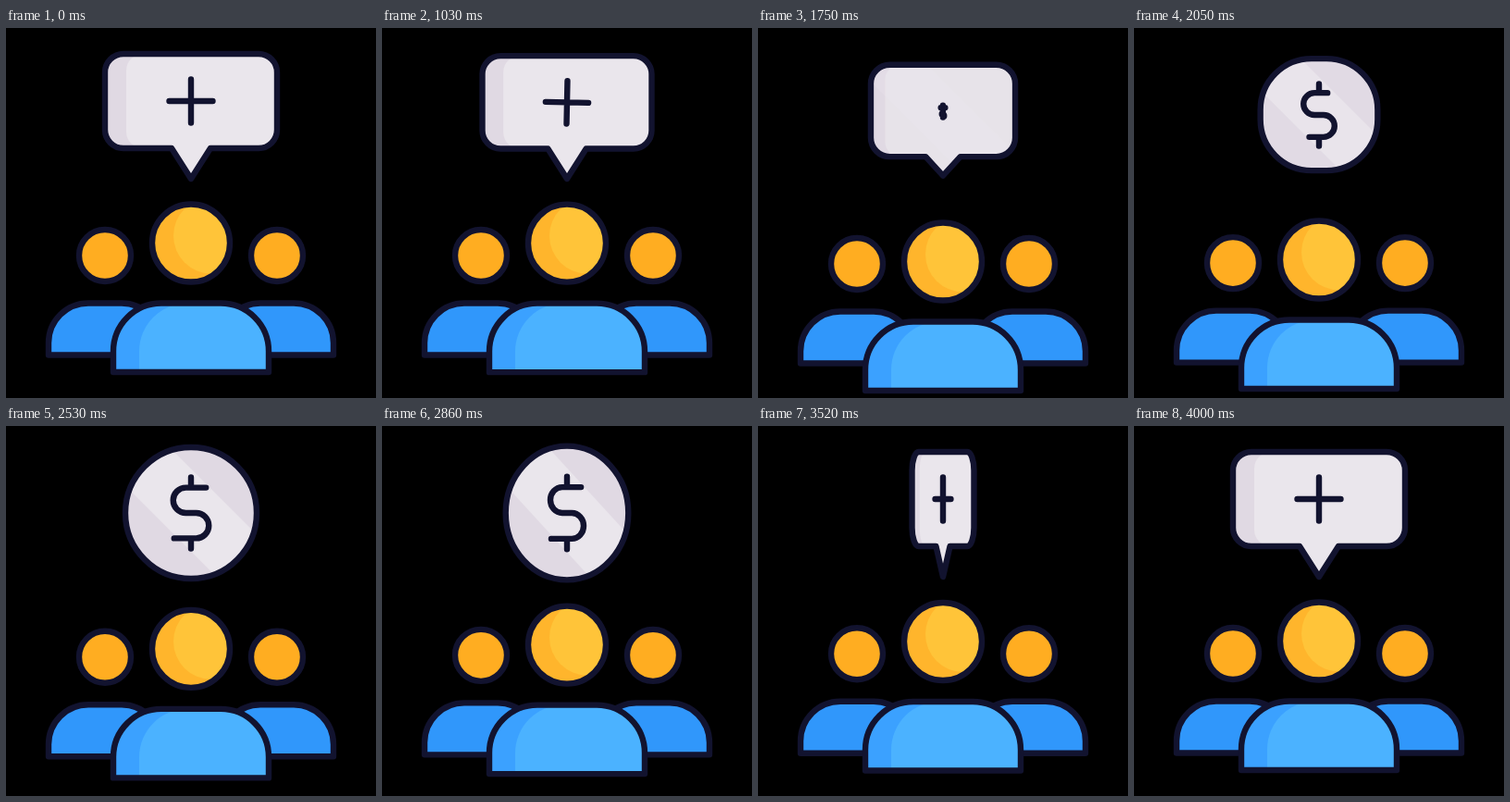
These frames come from a looping animation (400 by 400 pixels, 4030 ms). An HTML page with a canvas:

```html
<!DOCTYPE html>
<html lang="en">
<head>
<meta charset="utf-8">
<title>Team funding</title>
<style>
html, body { margin: 0; width: 100%; height: 100%; overflow: hidden; background: #000; }
canvas { display: block; width: 100vw; height: 100vh; object-fit: contain; }
</style>
</head>
<body>
<canvas width="400" height="400"></canvas>
<script>
const ctx = document.querySelector('canvas').getContext('2d');
const LOOP = 4030, START = 1030, STEP = 30, FLIP = 3400;
const INK = '#12132f', LIGHT = '#eae6ec', SHADE = '#e0d9e3';

const mix = (a, b, k) => a + (b - a) * k;
const clamp = k => Math.max(0, Math.min(1, k));
const linear = k => k;
const smooth = k => k * k * (3 - 2 * k);
const quadIn = k => k * k;
const quadOut = k => k * (2 - k);

function bezier(x1, x2) {
  return k => {
    let lo = 0, hi = 1;
    for (let i = 0; i < 24; i++) {
      const t = (lo + hi) / 2, u = 1 - t;
      const x = 3 * u * u * t * x1 + 3 * u * t * t * x2 + t * t * t;
      if (x < k) lo = t; else hi = t;
    }
    return smooth(lo);
  };
}
const settle = bezier(.33, .2);

// Each key is [time, value, easing towards this key].
function track(...keys) {
  return t => {
    if (t <= keys[0][0]) return keys[0][1];
    for (let i = 1; i < keys.length; i++) {
      const [t0, v0] = keys[i - 1], [t1, v1, ease = smooth] = keys[i];
      if (t < t1) return mix(v0, v1, ease((t - t0) / (t1 - t0)));
    }
    return keys[keys.length - 1][1];
  };
}

const drop = track([1000, 0], [1620, 20, settle], [1700, 20], [4000, 0, settle]);
const size = track([1000, 1], [1150, .92, linear], [1550, 1.074], [1860, .82],
  [2050, .883, linear], [2530, 1.014, linear], [2640, 1.055, quadOut], [3160, 1]);
const morph = track([1560, 0], [2150, 1]);
const flip = track([2640, 1], [FLIP, 0, quadIn], [4000, 1, quadOut]);
const plusTurn = track([1000, 0], [1150, 6, linear], [1390, -7, linear], [1550, -15], [1800, 0]);
const plusSize = track([1560, 1], [1800, 0]);
const signSize = track([1700, 0], [2000, 1]);
const signDraw = track([1750, 0], [2200, 1]);

function outline() {
  ctx.strokeStyle = INK;
  ctx.lineWidth = 6.4;
  ctx.lineCap = ctx.lineJoin = 'round';
  ctx.stroke();
}

function clipped(path, paint) {
  ctx.save();
  path();
  ctx.clip();
  paint();
  ctx.restore();
  path();
  outline();
}

function disc(x, y, r) {
  ctx.beginPath();
  ctx.arc(x, y, r, 0, 7);
}

function torso(left, right, top, bottom, r) {
  ctx.beginPath();
  ctx.moveTo(left, bottom);
  ctx.lineTo(left, top + r);
  ctx.arc(left + r, top + r, r, Math.PI, Math.PI * 1.5);
  ctx.arc(right - r, top + r, r, -Math.PI / 2, 0);
  ctx.lineTo(right, bottom);
  ctx.closePath();
}

function fill(color) {
  ctx.fillStyle = color;
  ctx.fill();
}

function sidePerson(x, dy) {
  torso(x - 61, x + 61, 297.5 + dy, 353.5 + dy, 43);
  fill('#3097fb');
  outline();
  disc(x, 246 + dy, 28);
  fill('#ffad21');
  outline();
}

function leader(dy) {
  const body = () => torso(116, 284, 297.5 + dy, 372 + dy, 52);
  clipped(body, () => {
    body();
    fill('#3ba1ff');
    torso(144, 340, 297.5 + dy, 380 + dy, 52);
    fill('#4bb2ff');
  });
  clipped(() => disc(200, 232.5 + dy, 42), () => {
    disc(200, 232.5 + dy, 42);
    fill('#ffb52c');
    disc(222, 224.5 + dy, 41);
    fill('#ffc439');
  });
}

// Rounded box with a tail; with radius equal to half its width it is a disc.
function balloon(w, top, bottom, r, tail) {
  const base = 21 * Math.min(1, tail / 8);
  ctx.beginPath();
  ctx.moveTo(0, top);
  ctx.arcTo(w, top, w, bottom, r);
  ctx.arcTo(w, bottom, 0, bottom, r);
  if (tail > 0) {
    ctx.lineTo(base, bottom);
    ctx.lineTo(0, bottom + tail);
    ctx.lineTo(-base, bottom);
  }
  ctx.arcTo(-w, bottom, -w, top, r);
  ctx.arcTo(-w, top, 0, top, r);
  ctx.closePath();
}

// Builds a path in scaled space, so that the line keeps its weight.
function scaled(x, y, sx, sy, turn, path) {
  ctx.save();
  ctx.translate(x, y);
  ctx.scale(sx, sy);
  ctx.rotate(turn * Math.PI / 180);
  path();
  ctx.restore();
}

function plusPath() {
  ctx.beginPath();
  ctx.moveTo(-23.5, 0);
  ctx.lineTo(23.5, 0);
  ctx.moveTo(0, -23.5);
  ctx.lineTo(0, 23.5);
}

function dollarPath(k) {
  const r = 13.5, bend = 5.5, q = Math.PI / 2;
  ctx.beginPath();
  ctx.moveTo(mix(-bend, 16, k), -2 * r);
  ctx.lineTo(-bend, -2 * r);
  ctx.arc(-bend, -r, r, -q, q, true);
  ctx.lineTo(bend, 0);
  ctx.arc(bend, r, r, -q, q);
  ctx.lineTo(mix(bend, -18, k), 2 * r);
  for (const side of [-1, 1]) {
    ctx.moveTo(0, side * 38);
    ctx.lineTo(0, side * 2 * r);
  }
}

function topSign(t) {
  const p = t < FLIP ? morph(t) : 0;
  const s = size(t), sx = s * flip(t);
  const anchor = mix(163, 94, p);
  const w = mix(93, 70, p), top = mix(28, 24, p), bottom = mix(130, 164, p);
  const r = mix(20, 70, p * p), tail = 33 * clamp(1 - p * 1.25);
  const place = draw => scaled(200, anchor, sx, s, 0, () => {
    ctx.translate(0, -anchor);
    draw();
  });
  const shape = () => place(() => balloon(w, top, bottom, r, tail));

  if (sx < .005) return;
  clipped(shape, () => place(() => {
    ctx.fillStyle = SHADE;
    ctx.fillRect(-110, 0, 220, 200);
    ctx.globalAlpha = 1 - p;
    ctx.beginPath();
    ctx.roundRect(-70, top, 200, bottom - top, 18);
    ctx.rect(-25, bottom - 3, 50, 40);
    fill(LIGHT);
    ctx.globalAlpha = p;
    ctx.beginPath();
    ctx.moveTo(-141, -6);
    ctx.lineTo(-53, -6);
    ctx.lineTo(147, 194);
    ctx.lineTo(59, 194);
    fill(LIGHT);
  }));

  const plus = t < FLIP ? plusSize(t) : 1;
  if (plus > .01) {
    const y = anchor + (79 - anchor) * s;
    scaled(200, y, sx * plus, s * plus, t < FLIP ? plusTurn(t) : 0, plusPath);
    outline();
  }
  const sign = t < FLIP ? signSize(t) : 0;
  if (sign > .01) {
    scaled(200, 94, sx * sign, s * sign, 0, () => dollarPath(signDraw(t)));
    outline();
  }
}

function draw(now) {
  const time = now % LOOP;
  const t = time < START ? 0 : START + Math.floor((time - START) / STEP) * STEP;
  const dy = drop(t);
  ctx.fillStyle = '#000';
  ctx.fillRect(0, 0, 400, 400);
  sidePerson(107, dy * .45);
  sidePerson(293, dy * .45);
  leader(dy);
  topSign(t);
}

const begin = performance.now();
function tick() {
  draw(performance.now() - begin);
  requestAnimationFrame(tick);
}
tick();
</script>
</body>
</html>
```
